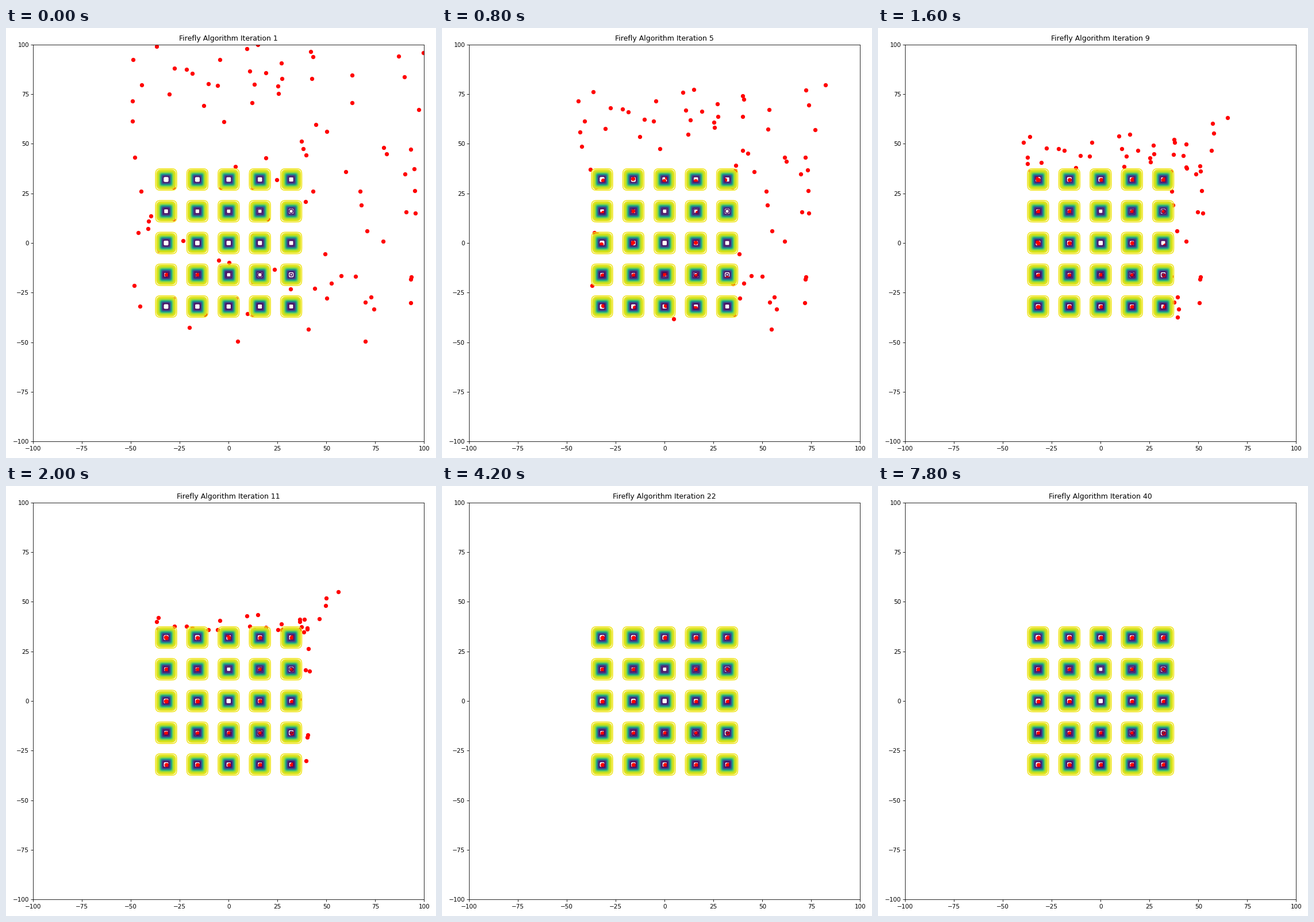
Animation of 748 by 748 pixels, one loop 8000 ms. Source, as a matplotlib script:

```python
import numpy as np
import matplotlib.pyplot as plt
from matplotlib.animation import FuncAnimation

SIZE, DPI = 748, 74.8
LEFT, RIGHT, TOP, BOTTOM = 47.3, 727.3, 28.7, 719.3
STEPS, INTERVAL = 40, 200
GRID_EDGE, BLOCK_EDGE = 37.4, 5.4

# The outermost fireflies; they arrive last and set the swarm's outline.
RIM = [(99.5, 96), (87, 94), (15, 100), (9.3, 98), (-37, 99), (-49, 92.5),
       (95.5, 15), (93.5, -17), (93, -30), (70, -49.5)]


def foxholes(x, y):
    total = 0.002
    for i in range(25):
        a, b = 16 * (i % 5 - 2), 16 * (i // 5 - 2)
        total = total + 1 / (i + 1 + (x - a) ** 6 + (y - b) ** 6)
    return 1 / total


def nearest_hole(p):
    return 16 * np.round(np.clip(p / 16, -2, 2))


def stays_empty(hole):
    return (hole[..., 0] == 0) & ((hole[..., 1] == 0) | (hole[..., 1] == 16))


def start_points(rng, loose=76):
    # Fireflies scattered over the clear ground around the blocks.
    field = rng.uniform(-50, 98, (400, 2))
    hole = nearest_hole(field)
    clear = np.abs(field - hole).max(axis=1) > BLOCK_EDGE + 0.4
    field = field[clear & ~stays_empty(hole)][:loose]

    # One firefly hidden under each block left of the last column.
    a, b = np.meshgrid([-32, -16, 0, 16], [-32, -16, 0, 16, 32])
    holes = np.column_stack([a.ravel(), b.ravel()]).astype(float)
    holes = holes[~stays_empty(holes)]
    settled = (holes[:, 0] < 0) & (holes[:, 1] == -16)
    offset = rng.choice([-3.8, 3.8], holes.shape)
    offset[settled] = 0
    return np.vstack([RIM, field, holes + offset])


def fly(points, steps):
    """Drift to the grid at a steady pace, then sink into the nearest hole."""
    far = np.abs(points)
    pace = np.maximum(2, 0.056 * far.max(axis=1) + 0.004 * far.min(axis=1))
    path = [points]
    for _ in range(steps - 1):
        p = path[-1]
        hole = nearest_hole(p)
        outside = np.abs(p).max(axis=1) > GRID_EDGE
        sinking = np.abs(p - hole).max(axis=1) < BLOCK_EDGE
        aim = np.where(outside[:, None], np.clip(p, -36, 36),
                       hole + [0.15, -0.15])
        gap = aim - p
        dist = np.hypot(gap[:, 0], gap[:, 1]) + 1e-9
        speed = np.where(sinking, np.minimum(1.4, 0.5 * dist), pace)
        path.append(p + gap * np.minimum(1, speed / dist)[:, None])
    return path


path = fly(start_points(np.random.default_rng(7)), STEPS)

fig = plt.figure(figsize=(SIZE / DPI, SIZE / DPI), dpi=DPI, facecolor="white")
ax = fig.add_axes([LEFT / SIZE, 1 - BOTTOM / SIZE,
                   (RIGHT - LEFT) / SIZE, (BOTTOM - TOP) / SIZE])

axis = np.linspace(-100, 100, 401)
X, Y = np.meshgrid(axis, axis)
ax.contour(X, Y, foxholes(X, Y), levels=50, cmap="viridis", zorder=2)
dots = ax.scatter(path[0][:, 0], path[0][:, 1], color="red", zorder=1)

ax.set_xlim(-100, 100)
ax.set_ylim(-100, 100)
ax.set_xticks(range(-100, 101, 25))
ax.set_yticks(range(-100, 101, 25))
title = ax.set_title("Firefly Algorithm Iteration 1")


def update(n):
    dots.set_offsets(path[n])
    title.set_text(f"Firefly Algorithm Iteration {n + 1}")
    return dots, title


anim = FuncAnimation(fig, update, frames=STEPS, interval=INTERVAL,
                     repeat=True, repeat_delay=0, blit=False)
plt.show()
```
